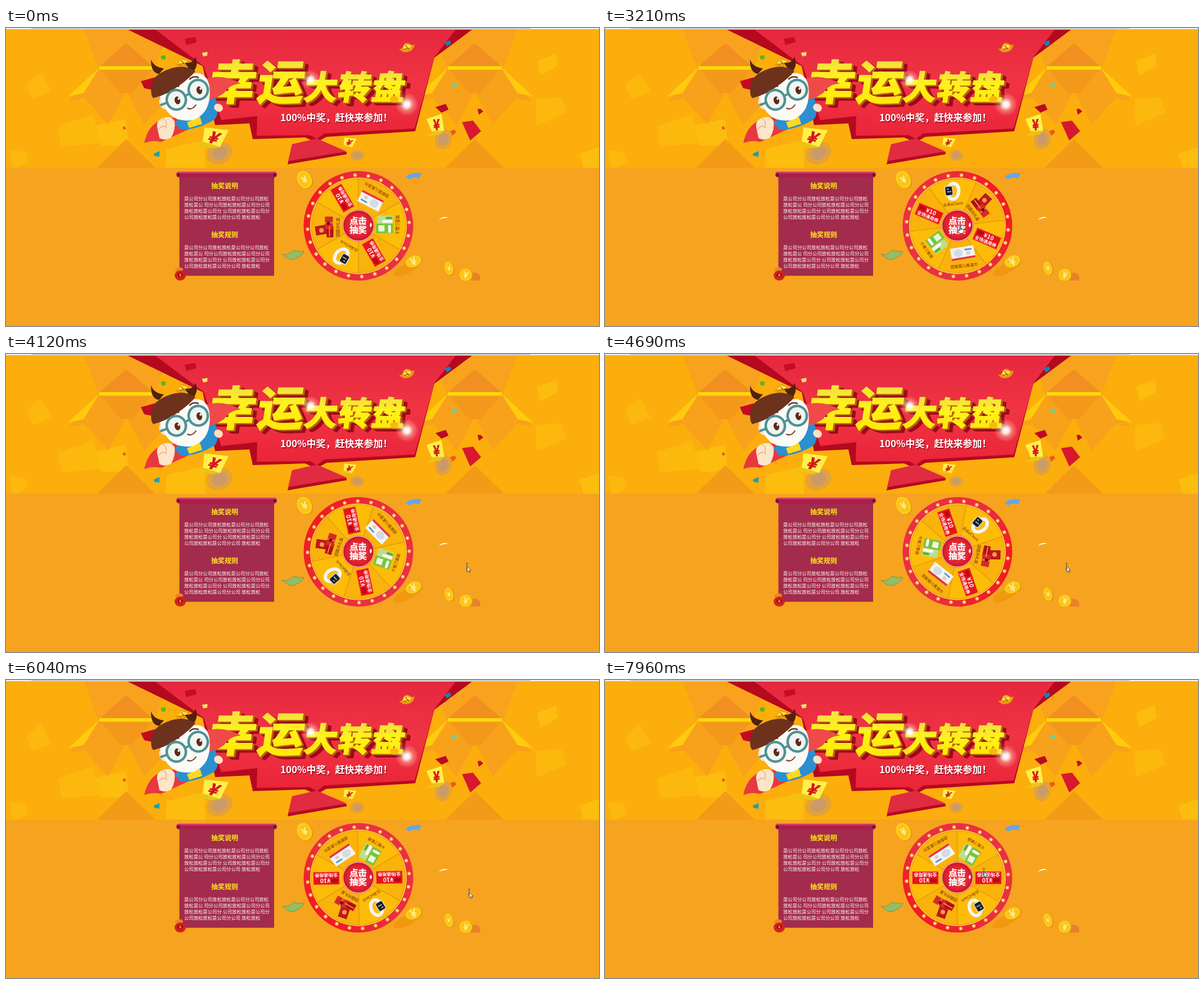
These frames come from a looping animation (1055x531 px, 8000 ms). An HTML page:

```html
<!DOCTYPE html>
<html lang="zh">
<head>
<meta charset="utf-8">
<title>幸运大转盘</title>
<style>
html, body { margin: 0; width: 100%; height: 100%; overflow: hidden; background: #f6a320; }
svg { display: block; width: 1055px; height: 531px; }
text { font-family: "Noto Sans CJK SC", "Noto Sans CJK JP", "Noto Sans", sans-serif; }
.b { font-weight: 900; }
.m { text-anchor: middle; }
</style>
</head>
<body>
<svg id="stage" viewBox="0 0 1055 531" xmlns="http://www.w3.org/2000/svg"></svg>
<script>
const path = (d, fill, more = '') => `<path d="${d}" fill="${fill}" ${more}/>`;
const line = (d, color, w) => path(d, 'none', `stroke="${color}" stroke-width="${w}" stroke-linecap="round"`);
const rect = (x, y, w, h, fill, more = '') => `<rect x="${x}" y="${y}" width="${w}" height="${h}" fill="${fill}" ${more}/>`;
const oval = (x, y, rx, ry, fill, turn = 0, more = '') =>
  `<ellipse cx="${x}" cy="${y}" rx="${rx}" ry="${ry}" fill="${fill}" transform="rotate(${turn} ${x} ${y})" ${more}/>`;
const text = (x, y, size, fill, s, more = '') => `<text x="${x}" y="${y}" font-size="${size}" fill="${fill}" ${more}>${s}</text>`;
const group = (move, s) => `<g transform="${move}">${s}</g>`;
const times = (n, f) => Array.from({ length: n }, (_, i) => f(i)).join('');
const fade = list => list.map(([o, c, a = 1]) => `<stop offset="${o}" stop-color="${c}" stop-opacity="${a}"/>`).join('');

let seed = 7;
const rand = () => (seed = seed * 16807 % 2147483647) / 2147483647;
const polar = (a, r) => `${(r * Math.sin(a)).toFixed(2)} ${(-r * Math.cos(a)).toFixed(2)}`;
// An irregular scrap with n corners
function shard(x, y, r, fill, n = 4) {
  const corners = Array.from({ length: n }, (_, i) => polar((i + rand() * .6) * 2 * Math.PI / n, r * (.75 + rand() * .5)));
  return path(`M${corners.join('L')}Z`, fill, `transform="translate(${x} ${y})"`);
}

const defs = `<defs>
<linearGradient id="red" x2="0" y2="1">${fade([[0, '#e6273f'], [.5, '#f03443'], [1, '#ea2439']])}</linearGradient>
<linearGradient id="gold" x2="0" y2="1">${fade([[0, '#fffbb0'], [.25, '#f5e13c'], [.5, '#fff21c'], [1, '#ffe400']])}</linearGradient>
<linearGradient id="ring" x2="1" y1="1" y2="0">${fade([[0, '#ea3049'], [.55, '#ea2d40'], [1, '#f80f14']])}</linearGradient>
<radialGradient id="glow">${fade([[0, '#fff'], [.25, '#fff', .9], [.55, '#fff3c0', .35], [1, '#fff', 0]])}</radialGradient>
<radialGradient id="knob">${fade([[0, '#f4434d'], [.75, '#e0222f'], [1, '#c4152a']])}</radialGradient>
<linearGradient id="beam">${fade([[0, '#fff', 0], [.5, '#fff'], [1, '#fff', 0]])}</linearGradient>
<clipPath id="top"><rect y="3" width="1055" height="246"/></clipPath>
<clipPath id="base"><rect width="1055" height="450"/></clipPath>
<g id="half">
${path('M0 3H75L50 72 20 118 0 108Z', '#f9a21d')}${path('M48 70L102 130 74 125 32 172 0 112Z', '#f8a11b')}
${path('M0 27L48 69H0Z', '#f18f20')}${path('M0 76H44L10 116H0Z', '#f3981b')}
${path('M0 68H48V74H0Z', '#ffd90a')}${path('M47 70L104 122 76 116Z', '#ffcb0c')}${path('M0 198L52 249H0Z', '#f39a17')}
</g>
<g id="fold"><use href="#half"/><use href="#half" transform="scale(-1 1)"/></g></defs>`;

// Banner
const patches = [[62, 108, 24], [190, 188, 34], [135, 180, 42], [320, 228, 40], [20, 235, 22], [962, 66, 22], [968, 140, 34], [1045, 240, 34]]
  .map(([x, y, r], i) => shard(x, y, r, i % 2 ? '#fcbd0f' : '#fdb80e')).join('');
const confetti = [[280, 52, 5, '#56b51f'], [354, 46, 6, '#f6e16a'], [785, 27, 6, '#1482bb'], [798, 100, 6, '#74cd9a'], [268, 224, 6, '#16a1b5'],
  [211, 178, 4, '#e8541a'], [776, 141, 10, '#bb0b22'], [795, 186, 5, '#ee5a1b'], [827, 180, 18, '#d8182f'], [842, 148, 6, '#c00d20'], [254, 98, 13, '#c20c20'], [329, 23, 11, '#c60d27']]
  .map(([x, y, r, c]) => shard(x, y, r, c)).join('');
const smudge = (x, y, r, turn) => oval(x, y, r * 1.25, r, '#e3a23a', turn) + oval(x, y, r * .75, r * .6, '#ca9b68', turn);

const note = move => group(move,
  path('M-10 17Q-24 16-36 8Q-20 12-14 8L14 17Q0 21-10 17Z', '#e9c515') + path('M-14-18L29-13 14 17-17 7Z', '#fff04a') +
  text(3, 10, 29, '#d5161e', '¥', 'class="b m" transform="rotate(16) skewX(-18)" stroke="#d5161e"'));
const ingot = (x, y) => group(`translate(${x} ${y}) rotate(-18)`,
  path('M-14-2Q-8 3-5-5Q2-10 7-4Q10 2 15-1Q10 10 0 9Q-10 9-14-2Z', '#e89a0a') +
  path('M-8 0L-1-6 9 0 2 6Z', '#fbdc48') + line('M-6 2L3 3M-1-4L2 5', '#9e4608', 1.2));

const banner = `<g clip-path="url(#top)">${rect(0, 3, 1055, 246, '#fcae0c')}${patches}
<use href="#fold" x="214"/><use href="#fold" x="834"/>
${smudge(380, 223, 19, -25)}${smudge(625, 227, 10, 0)}${smudge(778, 198, 15, 110)}
${path('M217 3H829L762 53 728 184 570 194 552 204 532 195 439 198 433 170 372 173 350 68Z', '#b5091f')}
${path('M266 3H800L762 52 727 179 566 188 553 198 541 191 446 192 447 157 383 164 352 68Z', 'url(#red)')}
${path('M509 208L606 221V225L501 243Z', '#b30b22')}${path('M509 207L553 197 606 220 502 237Z', '#e02b40')}
${confetti}${ingot(314, 61)}${ingot(713, 34)}</g>
${rect(0, 0, 1055, 3, '#f4f1ee')}${rect(45, 0, 888, 1, '#aaa')}${rect(0, 2, 1055, 1, '#c9b9a2')}`;

// Headline: two large signs, three smaller ones
const headline = (d, fill, w) => [...'幸运大转盘'].map((s, i) => {
  const [x, size] = i < 2 ? [400 + i * 86, 83] : [558 + (i - 2) * 60, 58];
  return group(`translate(${x + d} ${127 + d * .7}) skewX(-8)`,
    text(0, 0, size, fill, s, `class="b m" stroke="${fill}" stroke-width="${w}"`));
}).join('');
const ray = (x, y, r, turn) => oval(x, y, r, 1.2, 'url(#beam)', turn);
const flare = (x, y, r) => oval(x, y, r, r, 'url(#glow)') + ray(x, y, r * 3, -4) + ray(x, y, r * 2, 104);
const slogan = (d, fill) => text(488 + d, 166 + d, 17, fill, '100%中奖，赶快来参加！', 'font-weight="700"');
const title = [9, 7, 5, 3].map(d => headline(d, d > 4 ? '#9b0b1c' : '#b96208', 3)).join('') +
  headline(0, 'url(#gold)', 2.5) + oval(691, 127, 8, 6, '#fcb70e') +
  ray(475, 59, 120, 0) + ray(560, 134, 200, 0) + times(4, i => ray(392 + i * 63, 65 + i * 5, 36, 105)) +
  flare(542, 92, 17) + flare(713, 136, 21) + slogan(1.5, '#a51528') + slogan(0, '#fff');

// Boy in a cape
const lens = (x, y) => oval(x, y, 17, 17.5, '#f1f5f2', -22, 'stroke="#4f9294" stroke-width="4.5"') +
  oval(x + 2, y + 1, 5, 7, '#5a2c18', -15) + oval(x + 4, y - 2, 1.7, 2.2, '#fff');
const boy = path('M300 160Q255 160 246 205Q262 199 276 203L330 178Z', '#e8383f') +
  path('M352 92Q384 80 418 99Q398 100 388 116L362 132Z', '#ef4a49') +
  path('M300 168L352 132 372 124Q382 150 371 163Q340 182 310 181Z', '#2b8fd0') +
  path('M322 168L345 158 349 171 326 178Z', '#ffd91e') + oval(378, 142, 8, 7, '#fde0c0', 25) +
  path('M272 82Q257 79 258 56Q263 70 281 72ZM318 62Q334 63 337 51Q344 68 331 80Z', '#53210f') +
  oval(280, 134, 7, 11, '#fbe0c9', -20) +
  path('M273 119Q300 112 325 83Q356 73 362 104Q367 151 333 164Q287 172 273 119Z', '#fbfaf7') +
  path('M259 120Q254 91 277 79Q312 60 337 77Q327 89 309 102Q287 119 262 125Z', '#6c321c') +
  line('M291 107Q298 101 307 104M327 91Q333 85 342 88', '#6c321c', 2.5) +
  lens(303, 128) + lens(342, 110) + line('M319 121L326 117M287 133L276 137', '#4f9294', 4) +
  line('M323 143Q331 147 338 137', '#7d3a24', 2) +
  path('M270 181Q265 165 280 160Q294 156 300 166Q302 181 294 195Q283 202 273 196Z', '#fde5c8') +
  line('M272 180Q280 171 286 178M279 161Q287 165 285 174', '#e3a67c', 1.3);

// Rules panel
const copy = ['是公司分公司放松放松是公司分公司放松', '放松是公 司分公司放松放松是公司分公司', '放松放松是公司分 公司放松放松是公司分', '公司放松放松是公司分公司 放松放松'];
const block = (head, y) => text(389, y + 4.5, 12, '#ffe81a', head, 'class="b m"') +
  copy.map((s, i) => text(317, y + 25.5 + i * 11.2, 8.35, '#fff', s)).join('');
const panel = rect(308.5, 260, 168.5, 181.5, '#a32b4b') + rect(303, 256, 179, 10.5, '#a91f4b', 'rx="5"') +
  rect(305, 256, 175, 3, '#d23b60', 'rx="1.5"') + oval(307, 261.5, 2.2, 2.8, '#5d1430') + oval(478, 261.5, 2.2, 2.8, '#5d1430') +
  block('抽奖说明', 281) + block('抽奖规则', 368) +
  oval(308, 431, 7, 4.5, '#eb8524', -10) + oval(310, 441, 10, 9, '#d81f20') + oval(310, 440, 5, 4, '#8e1512') +
  text(310, 443, 7, '#ffd62a', '¥', 'class="b m"');

// Loose coins and notes
const coin = (x, y, rx, ry, turn) => oval(x + 2, y + 1, rx, ry, '#e2960b', turn) + oval(x, y, rx, ry, '#fdd01c', turn) +
  oval(x, y, rx * .8, ry * .8, '#fbc416', turn) +
  group(`translate(${x} ${y}) rotate(${turn})`, text(0, rx * .5, rx * 1.4, '#fff0a0', '¥', 'class="m" font-weight="700"'));
const loose = `<g clip-path="url(#base)">${oval(711, 430, 23, 9, '#f19810', -25)}${oval(834, 446, 10, 10, '#e8812b')}
${coin(531, 270, 12.5, 16, -28)}${coin(725, 416, 14, 10, -22)}${coin(788, 428, 7.5, 12, -15)}${coin(818, 440, 11, 11, 15)}
${path('M711 265Q722 256 739 259L735 268Q724 264 717 270Z', '#62a8e8')}
${path('M491 403Q500 407 511 396Q519 399 530 398Q526 407 518 409Q508 419 491 403Z', '#93be65', 'stroke="#678f47" stroke-width=".8"')}
${path('M770 342Q777 334 787 338Q778 338 770 342Z', '#fff')}</g>`;

// Wheel, drawn with the coupons level
const sixth = Math.PI / 3;
const slice = i => path(`M0 0L${polar(i * sixth, 84)}A84 84 0 0 1 ${polar(i * sixth + sixth, 84)}Z`, i % 2 ? '#fdbc08' : '#fab20c', 'stroke="#dd950a"');
const bulb = i => group(`rotate(${i * 15 - 3.8})`, oval(0, -90.5, 3.6, 3.6, '#f77a2c') + oval(0, -90.5, 2.4, 2.4, '#ffe58a'));
const coupon = x => group(`translate(${x} 0)`, rect(-23, -11, 46, 22, '#e8141c', 'stroke="#fa4a35" stroke-dasharray="2 1"') +
  rect(-20, -8, 11, 7, '#b70a17') + text(2, -.5, 10.5, '#fff', '¥10', 'class="b m"') +
  text(0, 8.7, 8.2, '#fff', '全场通用券', 'class="m" font-weight="700"'));
const watch = oval(3, 0, 10, 14, 'none', 12, 'stroke="#f4f4f2" stroke-width="6"') + rect(-12, -11, 15, 19, '#d8d8d5', 'rx="4"') +
  rect(-10.5, -9, 12, 15, '#191c22', 'rx="2"') + line('M-7-5H-5M-7 0H-1', '#9fb0a8', 2);
const gift = group('rotate(-10)', rect(-11, -18, 15, 24, '#c9151f', 'stroke="#8c0d14"') + oval(-4, -8, 4, 4, '#f0a04c')) +
  rect(-18, 2, 20, 12, '#b70d18') + rect(-3, -1, 22, 14, '#d92a25') + line('M-16 7H1M8-1V12', '#f0b050', 1.5) + oval(7, 5, 3, 3, '#701018');
const tubs = rect(-15, -16, 17, 30, '#77c43e') + rect(-12, -12, 11, 11, '#eaf6d8') + rect(2, -14, 14, 28, '#b9df91') +
  line('M6-3V11M-12 8H-3', '#f7faf1', 5) + line('M12 3V11', '#59ab34', 4);
const wipes = path('M-22-10L20-12 22 10-20 12Z', '#f1f4f5') + line('M-19 10L20 8', '#e43b3a', 4) +
  oval(-8, -1, 8, 7, '#d3dce2') + line('M5-6H15', '#4f9fd8', 3) + oval(10, 1, 4, 3, '#f0c9b8');
const prize = (x, y, turn, art, label) => group(`translate(${x} ${y}) rotate(${turn})`,
  art + text(0, 25, 6.9, '#6d2406', label, 'class="m" font-weight="500"'));
const wheel = oval(0, 0, 97.5, 97.5, 'url(#ring)') + oval(0, 0, 86, 86, '#ffd54b') + times(6, slice) + times(24, bulb) +
  coupon(-55) + coupon(57) + prize(-34, -52, -30, watch, '云朵eClock') + prize(27, -52, 30, gift, '团圆月礼盒') +
  prize(-22, 42, 30, tubs, '千鹭汀套装') + prize(28, 41, -30, wipes, '团絮婴儿柔湿巾');
const label = (y, s) => text(626.5, y, 15.3, '#fff', s, 'class="b m" stroke="#fff" stroke-width=".4"');
const knob = oval(627, 352, 29, 29, '#e8751a') + oval(627, 352, 27.5, 27.5, 'url(#knob)', 0, 'stroke="#f9b3a8" stroke-width="1.4"') +
  label(348.5, '点击') + label(364.5, '抽奖') + oval(649, 351, 1.7, 3.6, '#fff', 5);

const dialog = rect(401, 0, 252, 69, '#40200c', 'opacity=".3"') + rect(402, -2, 249.5, 69, '#fff') +
  text(411.5, 15, 8.4, '#333', '此网页显示') + text(411.5, 30.5, 7.6, '#666', '恭喜您获得10元全场通用券') +
  rect(606.5, 41.5, 37, 17, '#4a6fdc', 'stroke="#a9bff5" stroke-width="1.5" rx="1"') + text(625, 52.8, 7, '#fff', '确定', 'class="m"');

const pointers = {
  arrow: path('M0 0V10L2.4 8 4 11.5 5.6 10.8 4.1 7.4H7Z', '#fff', 'stroke="#222" stroke-width=".8"'),
  hand: path('M-1 0Q0-1 1 0V4L6 5Q7 6 6 9L5 12H-1L-4 7Q-4 5-1 7Z', '#fff', 'stroke="#222" stroke-width=".8"'),
  beam: line('M-1.5-5H1.5M0-5V5M-1.5 5H1.5', '#555', 1),
};

const el = id => document.getElementById(id);
const show = (id, on) => el(id).setAttribute('display', on ? 'inline' : 'none');
el('stage').innerHTML = defs + rect(0, 0, 1055, 531, '#f6a320') + banner + title + boy +
  note('translate(367 195)') + note('translate(609 204) scale(.5)') + note('translate(764 173) rotate(-28) scale(.65 .95)') +
  panel + loose + `<g id="wheel">${wheel}</g>${knob}<g id="dialog">${dialog}</g><g id="pointer">` +
  Object.entries(pointers).map(([k, s]) => `<g id="${k}">${s}</g>`).join('') + '</g>';

// The screen refreshes about every 140 ms, in step with these moments
const beats = [680, 1790, 2900, 3210, 3970, 4120, 5110, 5350, 6160, 6850, 7240, 7960];
function refresh(ms) {
  const i = beats.findLastIndex(b => b <= ms);
  if (i < 0 || i === beats.length - 1) return beats[i] || 0;
  const span = beats[i + 1] - beats[i], step = span / Math.round(span / 140);
  return beats[i] + Math.floor((ms - beats[i]) / step) * step;
}

// Pointer stops: time, x, y
const stops = [[680, 284, 420], [1670, 554, 118], [2070, 430, 57], [2560, 699, 371], [2780, 632, 354], [3210, 632, 354],
  [3820, 820, 378], [6160, 824, 378], [6850, 619, 417], [7240, 627, 51], [7530, 627, 51], [7960, 674, 341]];
function pointerAt(t) {
  const i = stops.findIndex(s => s[0] > t);
  if (i < 1) return stops.at(i).slice(1);
  const [t0, x0, y0] = stops[i - 1], [t1, x1, y1] = stops[i];
  const p = (t - t0) / (t1 - t0), e = p * p * (3 - 2 * p);
  return [x0 + (x1 - x0) * e, y0 + (y1 - y0) * e];
}

const spin = { start: 2755, length: 3742, end: 1620, travel: 1380, power: 3.5 };
function draw(ms) {
  const t = refresh(ms);
  const left = 1 - Math.max(0, Math.min(1, (t - spin.start) / spin.length));
  el('wheel').setAttribute('transform', `translate(627 352.5) rotate(${spin.end - spin.travel * left ** spin.power})`);
  show('dialog', t >= 6800 && t < 7600);
  el('dialog').setAttribute('opacity', t < 6900 ? .86 : 1);
  const [x, y] = pointerAt(t);
  const kind = t > 6700 && t < 6950 ? 'beam' : Math.hypot(x - 627, y - 352) < 28 ? 'hand' : 'arrow';
  show('pointer', t >= 680 + 100);
  for (const k in pointers) show(k, k === kind);
  el('pointer').setAttribute('transform', `translate(${x} ${y})`);
}
const start = performance.now();
function loop() {
  draw((performance.now() - start) % 8000);
  requestAnimationFrame(loop);
}
loop();
</script>
</body>
</html>
```
